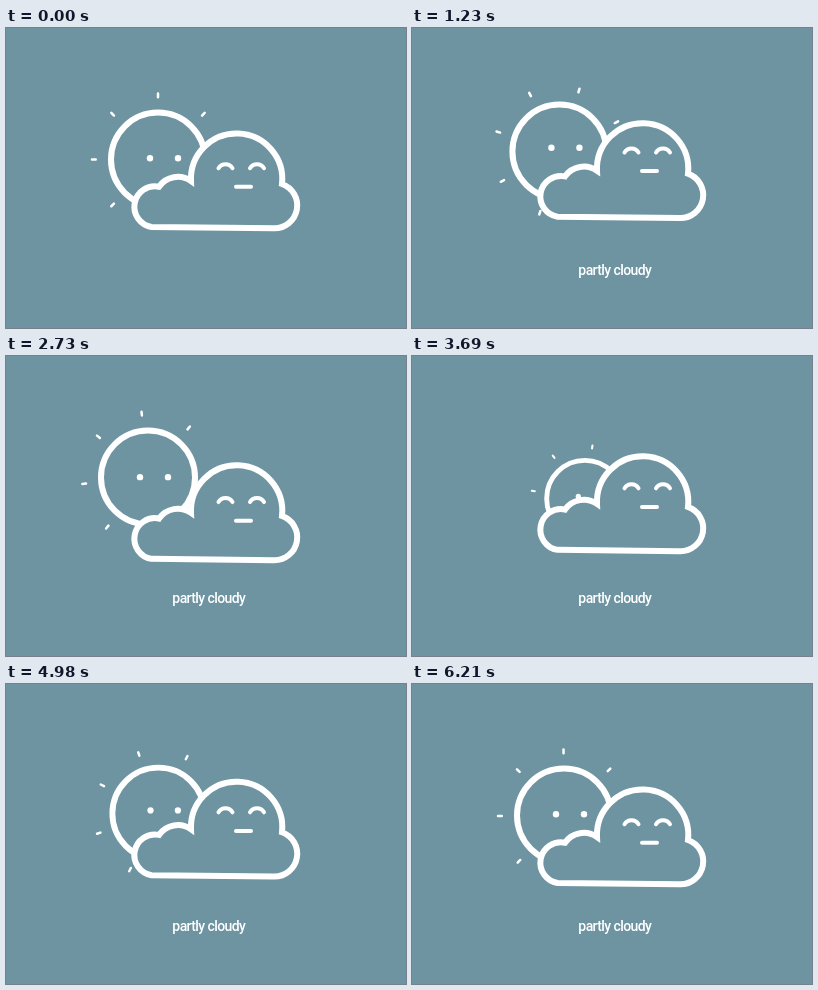
Write an HTML page that moves like this. It is 400 px wide and 300 px high and loops after 6240 ms.

```html
<!DOCTYPE html>
<html lang="en">
<head>
<meta charset="utf-8">
<title>partly cloudy</title>
<style>
html, body { margin: 0; width: 100%; height: 100%; overflow: hidden; background: #6e94a2; }
svg { display: block; width: 400px; height: 300px; }
.line { fill: none; stroke: #fff; stroke-linecap: round; }
text { font: 500 14px Roboto, "Liberation Sans", sans-serif; letter-spacing: -0.6px; fill: #fff; text-anchor: middle; }
</style>
</head>
<body>
<svg viewBox="0 0 400 300">
  <g id="sun">
    <circle class="line" r="47" stroke-width="6"/>
    <g id="rays" class="line" stroke-width="2.5"></g>
    <g id="sunEyes" fill="#fff"><circle cx="-8" r="3.2"/><circle cx="20" r="3.2"/></g>
  </g>
  <path id="cloud" fill="#6e94a2" stroke="#fff" stroke-width="6" d="M145.5 199A20.5 20.5 0 1 1 153 158.7A23 23 0 0 1 185 153A45.65 45.65 0 1 1 276 156A22.8 22.8 0 0 1 268 200.3Z"/>
  <path id="face" class="line" stroke-width="4" d="M212.5 140.2a8.1 8.1 0 0 1 14 0M244 140.2a8.1 8.1 0 0 1 14 0M230 158.8h15"/>
  <text id="label" x="202.8" y="247">partly cloudy</text>
</svg>
<script>
const LOOP = 6240;
const $ = id => document.getElementById(id);
const place = (id, transform) => $(id).setAttribute("transform", transform);

// Eased progress from 0 to 1 between two times
function ease(t, from, to) {
  const u = Math.min(1, Math.max(0, (t - from) / (to - from)));
  return (1 - Math.cos(Math.PI * u)) / 2;
}

for (let i = 0; i < 8; i++) {
  $("rays").innerHTML += `<path d="M0 -66V-62.3" transform="rotate(${i * 45})"/>`;
}

function draw(t) {
  // The cloud rises and sinks twice, a little deeper in the middle
  const bob = -10.6 * ease(t, 0, 1380) + 14.6 * ease(t, 1380, 2820)
            - 14.6 * ease(t, 2820, 4320) + 10.6 * ease(t, 4320, LOOP);

  // The sun drifts out, hides behind the cloud and comes back
  const drift = ease(t, 0, 2600), hide = ease(t, 3120, 3600), back = ease(t, 3600, 5100);
  const x = 152 - 10 * drift + 31 * hide - 21 * back;
  const y = 131.6 - 11.2 * drift + 23.6 * hide - 12.4 * back + 0.28 * bob;
  const size = 1 - 0.23 * (ease(t, 3100, 3920) - ease(t, 3920, 5250));

  place("cloud", `translate(0 ${bob})`);
  place("face", `translate(0 ${bob * 1.53})`);
  place("sun", `translate(${x} ${y}) scale(${size})`);
  place("sunEyes", `translate(0 ${bob * 0.25 - 1.3})`);
  place("rays", `rotate(${90 * t / LOOP})`);
  $("label").style.visibility = t < 30 ? "hidden" : "visible";
}

const start = performance.now();
function tick() {
  draw((performance.now() - start) % LOOP);
  requestAnimationFrame(tick);
}
tick();
</script>
</body>
</html>
```
